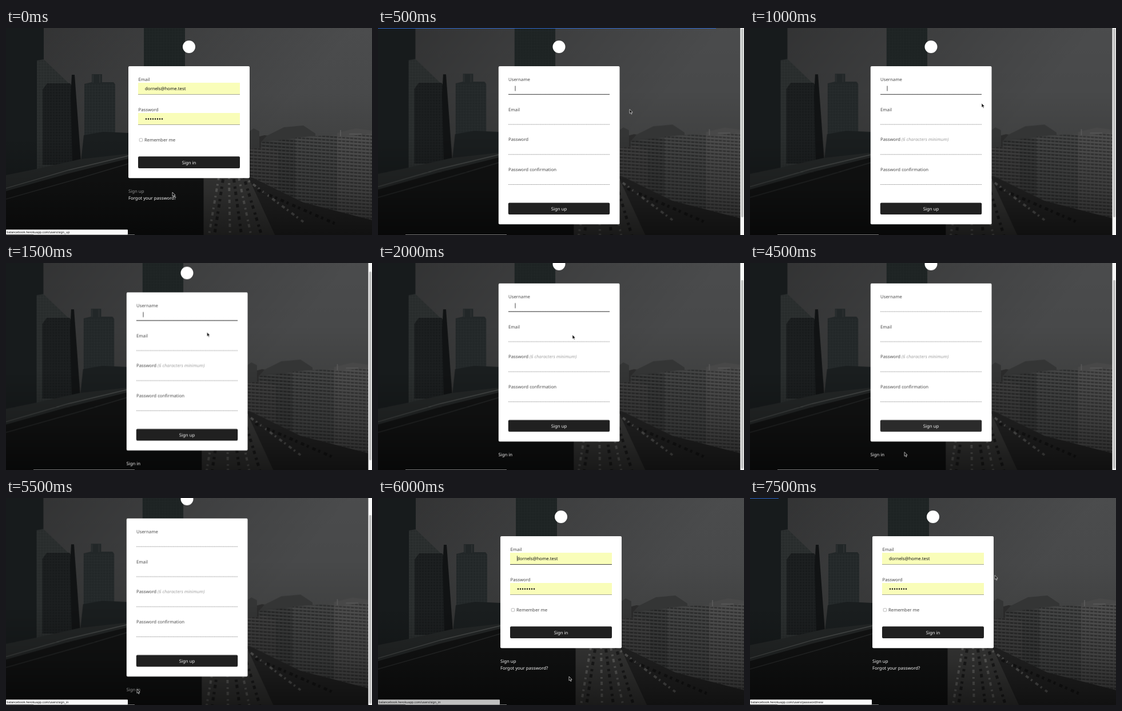
An HTML page that plays this animation: 640x363 px, repeating every 8000 ms.

```html
<!DOCTYPE html>
<html lang="en">
<head>
<meta charset="utf-8">
<title>Sign in and sign up</title>
<style>
html, body { margin: 0; width: 100%; height: 100%; overflow: hidden; background: #0b0b0b; }
svg { display: block; width: 640px; height: 363px; }
text { font: 7.78px "Noto Sans", sans-serif; fill: #484848; text-rendering: geometricPrecision; white-space: pre; }
.mid { text-anchor: middle; }
.light { fill: #f4f4f4; }
.value { fill: #151515; }
.hint { font-style: italic; fill: #a0a0a0; }
.status { font: 5.7px "Liberation Sans", Arial, sans-serif; fill: #222; }
.option { font: bold 6.65px "Liberation Sans", Arial, sans-serif; fill: #111; }
.btn { fill: #202020; }
.rule { stroke: #777; stroke-width: .8; stroke-dasharray: 1 .6; }

/* one step of the timeline is 500 ms = 6.25% */
.t { animation: 8s step-end infinite; }
.photo { animation-name: photo; }
.login { animation-name: login; }
.signup { animation-name: signup; }
.page { animation-name: page; }
.thumb { animation-name: thumb; }
.focus { animation-name: focus; }
.note { animation-name: note; }
.menu { animation-name: menu; }
.press { animation-name: press; }
.up { animation-name: up; }
.in { animation-name: in; }
.forgot { animation-name: forgot; }
.caret { animation-name: caret; }
.load { animation-name: load; }
.bar { animation-name: bar; }
.barfill { animation-name: barfill; }
.url-up { animation-name: urlup; }
.url-in { animation-name: urlin; }
.url-new { animation-name: urlnew; }
.cursor { animation-name: cursor; }

@keyframes photo { 0%, 75% { transform: none } 6.25% { transform: scale(.9906) } }
@keyframes login { 0%, 75% { opacity: 1 } 6.25% { opacity: 0 } }
@keyframes signup { 0%, 75% { opacity: 0 } 6.25% { opacity: 1 } }
@keyframes page {
  0% { transform: none }
  18.75% { transform: translateY(-15.5px) }
  25% { transform: translateY(-31.2px) }
}
@keyframes thumb {
  0% { transform: none }
  18.75% { transform: translateY(14px) }
  25% { transform: translateY(28.5px) }
}
@keyframes focus {
  0% { transform: none; opacity: 1 }
  31.25% { transform: translateY(52.7px); opacity: 1 }
  50% { opacity: 0 }
}
@keyframes note { 0% { opacity: 0 } 12.5% { opacity: 1 } }
@keyframes menu { 0%, 50% { opacity: 0 } 37.5% { opacity: 1 } }
@keyframes press { 0%, 62.5% { fill: #202020 } 56.25% { fill: #2b2b2b } }
@keyframes up { 0% { fill: #909090 } 6.25% { fill: #f4f4f4 } }
@keyframes in { 0% { fill: #f4f4f4 } 68.75% { fill: #909090 } }
@keyframes forgot { 0%, 93.75% { fill: #f4f4f4 } 87.5% { fill: #909090 } }
@keyframes caret { 0%, 81.25% { opacity: 0 } 75% { opacity: 1 } }
@keyframes load {
  0%, 12.5% { transform: scaleX(0) }
  6.25% { transform: scaleX(590) }
  93.75% { transform: scaleX(50) }
}
@keyframes bar { 0%, 68.75%, 87.5% { opacity: 1 } 6.25%, 81.25% { opacity: 0 } }
@keyframes barfill { 0%, 87.5% { fill: #fafafa } 75% { fill: #c0c0c0 } }
@keyframes urlup { 0% { opacity: 1 } 6.25% { opacity: 0 } }
@keyframes urlin { 0%, 81.25% { opacity: 0 } 68.75% { opacity: 1 } }
@keyframes urlnew { 0% { opacity: 0 } 87.5% { opacity: 1 } }
@keyframes cursor {
  0% { transform: translate(291px, 288px) }
  6.25% { transform: translate(440px, 142.5px) }
  12.5% { transform: translate(405px, 132px) }
  18.75% { transform: translate(351.5px, 121.5px) }
  25% { transform: translate(340px, 126px) }
  31.25% { transform: translate(318px, 140px) }
  37.5% { transform: translate(299.5px, 262px) }
  43.75% { transform: translate(297px, 264px) }
  50% { transform: translate(286px, 288px) }
  56.25% { transform: translate(270px, 331.5px) }
  62.5% { transform: translate(252px, 334px) }
  68.75% { transform: translate(229px, 335px) }
  75% { transform: translate(334px, 313px) }
  81.25% { transform: translate(318px, 309px) }
  87.5% { transform: translate(284px, 298px) }
  93.75% { transform: translate(428px, 135.5px) }
}
</style>
</head>
<body>
<svg viewBox="0 0 640 363">
  <defs>
    <linearGradient id="sky" x2="0" y2="1">
      <stop offset="0" stop-color="#4b4c4d"/>
      <stop offset=".3" stop-color="#48494a"/>
      <stop offset=".55" stop-color="#3f4040"/>
      <stop offset="1" stop-color="#1b1b1b"/>
    </linearGradient>
    <linearGradient id="haze" x2=".75" y2=".4">
      <stop offset="0" stop-opacity=".36"/>
      <stop offset="1" stop-opacity="0"/>
    </linearGradient>
    <linearGradient id="shade" x2="0" y2="1">
      <stop offset=".5" stop-opacity="0"/>
      <stop offset=".75" stop-opacity=".22"/>
      <stop offset="1" stop-opacity=".62"/>
    </linearGradient>
    <pattern id="grid" width="5" height="5" patternUnits="userSpaceOnUse">
      <path d="M0 1H5M1 0V5" stroke="#fff" stroke-width=".7" opacity=".04"/>
    </pattern>
    <pattern id="floors" width="7" height="6" patternUnits="userSpaceOnUse" patternTransform="skewY(4)">
      <rect width="5" height="2.4" opacity=".3"/>
      <rect y="3.2" width="7" height="1.2" fill="#fff" opacity=".07"/>
    </pattern>
  </defs>

  <g class="t photo">
    <rect width="640" height="380" fill="url(#sky)"/>
    <rect width="640" height="380" fill="url(#haze)"/>
    <!-- left skyline -->
    <path d="M54 57 66 55 114 101 126 238 54 248Z" fill="#282c2c"/>
    <path d="M64 108 72 97H112L117 104V240H64Z" fill="#181b1c"/>
    <path d="M54 57 66 55 114 101 126 238 54 248Z" fill="url(#grid)"/>
    <path d="M0 0H66V55L54 57V252L0 268Z" fill="#171b1c"/>
    <path d="M115 82H120L131 234H116L113 120Z" fill="#111314"/>
    <path d="M137 98 150 95V81H168V95H188L191 99V216H137Z" fill="#222728"/>
    <path d="M137 98H191V216H137Z" fill="url(#grid)"/>
    <path d="M152 82V96M164 82V96" stroke="#343839"/>
    <path d="M136 188 170 182 214 184 245 150V245H130Z" fill="#1a1e1f"/>
    <path d="M241 0H313V300H241Z" fill="#1d2323"/>
    <path d="M241 0H313V300H241Z" fill="url(#grid)" opacity=".5"/>
    <!-- right skyline -->
    <path d="M313 205 420 196 452 188 640 215V380H313Z" fill="#2b2b2b"/>
    <path d="M426 181 433 176 443 181V240H426Z" fill="#343535"/>
    <path d="M446 200 456 189 486 174 520 171 541 185V300H446Z" fill="#343535"/>
    <path d="M446 200 541 190V300H446Z" fill="url(#floors)"/>
    <path d="M506 192 582 187V322L506 306Z" fill="#3e3f3f"/>
    <path d="M506 192 582 187V322L506 306Z" fill="url(#floors)"/>
    <path d="M579 184 612 176 640 180V337L579 322Z" fill="#484848"/>
    <path d="M579 192 640 185V337L579 322Z" fill="url(#floors)"/>
    <path d="M600 186H622M585 179V190" stroke="#636363" stroke-width="1.2"/>
    <path d="M426 212 456 209 476 216V290H426Z" fill="#393939"/>
    <path d="M426 212 456 209 476 216V290H426Z" fill="url(#floors)"/>
    <!-- street -->
    <path d="M343 262H430L520 306 640 337V380H343Z" fill="#252525"/>
    <path d="M346 262H424L478 380H346Z" fill="#3a3a39"/>
    <path d="M352 380 372 262M392 380 390 262M432 380 407 262M424 268 520 340" fill="none" stroke="#8d8d8b" stroke-width="4" stroke-dasharray="3 7 6 5" opacity=".5"/>
    <path d="M362 380 380 262M414 380 398 262M452 380 416 262M440 284 580 345" fill="none" stroke="#0c0c0c" stroke-width="5" stroke-dasharray="6 5 4 7" opacity=".6"/>
    <!-- foreground roof -->
    <path d="M0 258 54 247 130 230 245 217V276L130 318 60 380H0Z" fill="#242727"/>
    <path d="M0 286 110 255 214 229 241 217H313L345 265V380H0Z" fill="#121313"/>
    <path d="M0 281 110 249 214 224" fill="none" stroke="#484b4a" stroke-width="1.3"/>
    <path d="M0 300 120 266 214 238" fill="none" stroke="#272929" stroke-width="1.5"/>
    <rect width="640" height="380" fill="url(#shade)"/>
  </g>

  <g class="t login">
    <circle cx="320" cy="33" r="11" fill="#fff"/>
    <rect x="214" y="67" width="212" height="196.3" rx="2" fill="#fff"/>
    <text x="231.5" y="93">Email</text>
    <path d="M231 96H409V117H231ZM231 149H409V170H231Z" fill="#f9fdb9"/>
    <path d="M231 116.5H409M231 169.5H409" stroke="#a5a795"/>
    <text class="value" x="243" y="109">dornels@home.test</text>
    <path class="t caret" d="M243.5 101.5V110.5M231 116.5H409" stroke="#444"/>
    <text x="231.5" y="145.7">Password</text>
    <path d="M245 159.5H274" stroke="#151515" stroke-width="2.5" stroke-linecap="round" stroke-dasharray="0 4"/>
    <rect x="233.2" y="193.6" width="5.4" height="5.4" rx="1" fill="#fff" stroke="#aaa" stroke-width=".8"/>
    <text x="242" y="198.6">Remember me</text>
    <rect class="btn" x="231" y="225.3" width="178" height="20.7" rx="2"/>
    <text class="mid light" x="320" y="238.7">Sign in</text>
    <text class="t up" x="214" y="289.3">Sign up</text>
    <text class="t forgot" x="214" y="300.9">Forgot your password?</text>
  </g>

  <g class="t signup">
    <g class="t page">
      <circle cx="316.5" cy="33" r="11" fill="#fff"/>
      <rect x="210.8" y="67" width="211.7" height="277.3" rx="2" fill="#fff"/>
      <text x="228" y="93">Username</text>
      <text x="228" y="145.7">Email</text>
      <text x="228" y="198.4">Password</text>
      <text class="t note hint" x="265" y="198.4">(6 characters minimum)</text>
      <text x="228" y="251.1">Password confirmation</text>
      <path class="rule" d="M228 116.4H405M228 169.1H405M228 221.8H405M228 274.5H405"/>
      <path class="t focus" d="M240 101.5V110.5M228 116.4H405" stroke="#444" stroke-width="1"/>
      <g class="t menu">
        <rect x="228" y="170.3" width="177" height="11.7" fill="#fff" stroke="#aaa" stroke-width=".8"/>
        <text class="option" x="232" y="178.7">dornels@home.test</text>
      </g>
      <rect class="t press" x="227.8" y="306.4" width="177.4" height="20.6" rx="2"/>
      <text class="mid light" x="316.5" y="319.8">Sign up</text>
      <text class="t in" x="210.5" y="370.3">Sign in</text>
    </g>
    <rect x="633.5" width="6.5" height="363" fill="#f8f8f8"/>
    <rect class="t thumb" x="635" y="1" width="4" height="331" rx="2" fill="#c2c2c2"/>
  </g>

  <path d="M48 362.5H225" stroke="#777"/>
  <g class="t bar">
    <rect class="t barfill" y="353.5" width="213" height="8.8" rx="1"/>
    <text class="t url-up status" x="1.3" y="360">balancebook.herokuapp.com/users/sign_up</text>
    <text class="t url-in status" x="1.3" y="360">balancebook.herokuapp.com/users/sign_in</text>
    <text class="t url-new status" x="1.3" y="360">balancebook.herokuapp.com/users/password/new</text>
  </g>
  <rect class="t load" width="1" height="1.2" fill="#2a66d0"/>
  <path class="t cursor" d="M0 0V7.3L1.7 5.8 2.9 8.5 4.1 8 3 5.3H5.2Z" fill="#080808" stroke="#eee" stroke-width=".7"/>
</svg>
</body>
</html>
```
